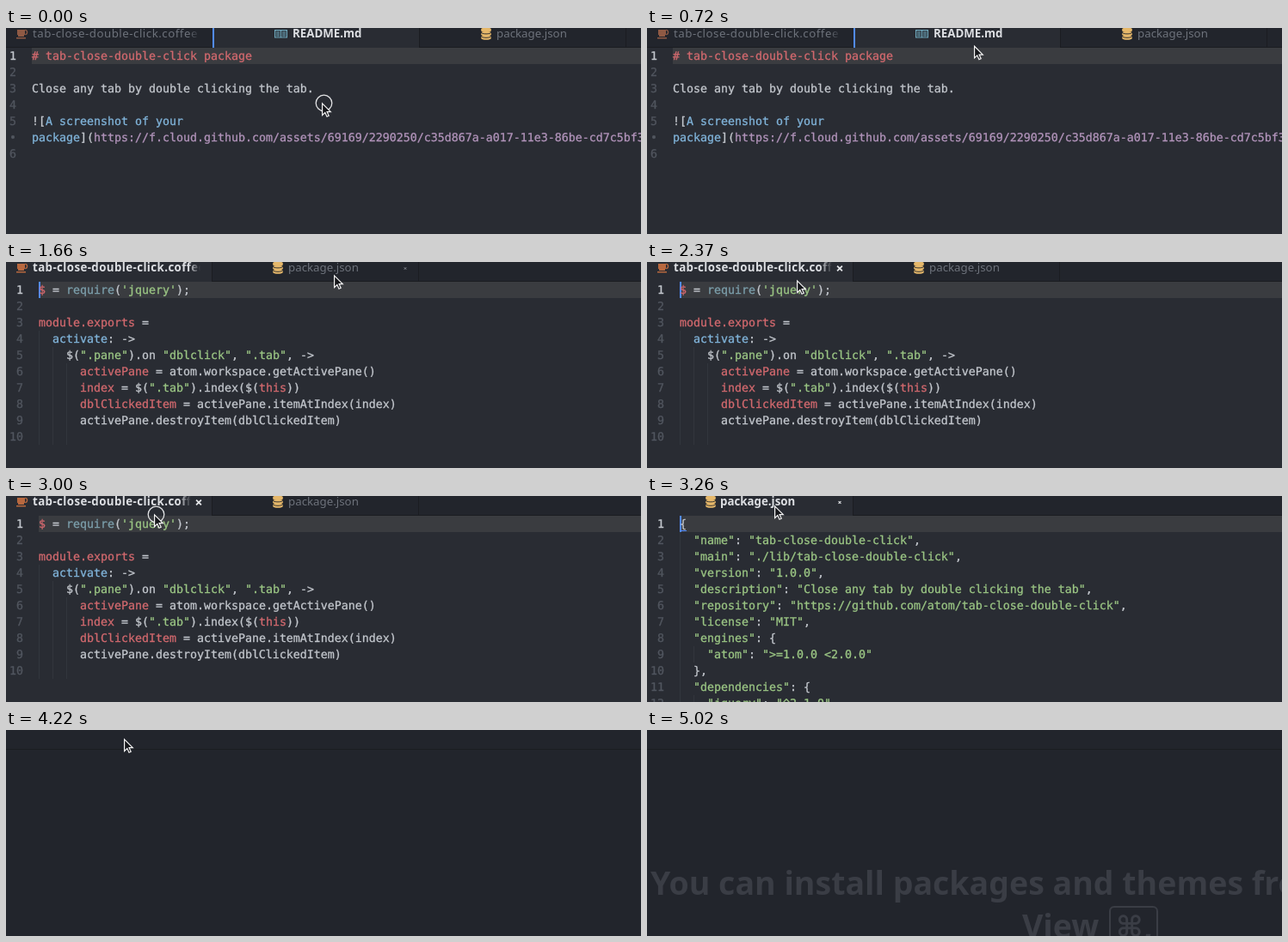
An HTML page with a canvas that plays this animation: 738x240 px, repeating every 5290 ms.

```html
<!DOCTYPE html>
<html lang="en">
<head>
<meta charset="utf-8">
<title>Closing tabs with a double click</title>
<style>
html, body { margin: 0; width: 738px; height: 240px; overflow: hidden; background: #22252c; }
#stage { position: relative; width: 738px; height: 240px; overflow: hidden; }
canvas, .scene { position: absolute; left: 0; top: 0; width: 738px; height: 240px; overflow: hidden; }
.scene { visibility: hidden; }
.scene div { position: absolute; white-space: pre; }
.row, .num { font: 13.29px/19px "DejaVu Sans Mono", monospace; text-rendering: geometricPrecision; -webkit-text-stroke: .3px; }
.num { color: #51565f; text-align: right; }
.num.on { color: #c3c7cd; }
.tab { top: -3px; height: 18px; overflow: hidden; font: 500 13.3px/18px "Noto Sans", "Open Sans", sans-serif; color: #6d727b; }
.tab.on { color: #dddfe3; font-weight: 600; }
.long { letter-spacing: .5px; -webkit-mask-image: linear-gradient(to left, transparent, #000 14px); mask-image: linear-gradient(to left, transparent, #000 14px); }
.long.on { letter-spacing: .4px; }
.tip { font: bold 37.5px/50px "Noto Sans", "Open Sans", sans-serif; color: #3a3d45; }
.key { left: 537px; top: 205px; width: 53px; height: 50px; border: 2px solid #3a3d45; border-radius: 6px; }
.mark { font: bold 34px/50px "DejaVu Sans", sans-serif; color: #3a3d45; }
</style>
</head>
<body>
<div id="stage"></div>
<script>
const LOOP = 5290, W = 738, H = 240, ROW = 19, TOP = 23, CH = 8;
const BAR = '#22252c', PAGE = '#292c33', EDGE = '#1b1d21';
const INK = { w: '#c3c7cd', r: '#d2696e', b: '#80b4da', p: '#b294bb', g: '#9bc684', c: '#7c9fab' };
const stage = document.getElementById('stage');

function add(parent, cls, x, y, text) {
  const el = document.createElement('div');
  el.className = cls;
  if (x !== null) el.style.left = x + 'px';
  if (y !== null) el.style.top = y + 'px';
  el.textContent = text;
  parent.appendChild(el);
  return el;
}

function layer() {
  const c = document.createElement('canvas');
  c.width = W;
  c.height = H;
  stage.appendChild(c);
  return c.getContext('2d');
}

// "~x" switches to ink x
function codeRow(scene, x, y, src) {
  const row = add(scene, 'row', x, y, '');
  for (const part of ('~w' + src).split('~').slice(1)) {
    const span = document.createElement('span');
    span.style.color = INK[part[0]];
    span.textContent = part.slice(1);
    row.appendChild(span);
  }
}

function makeScene(codeX, lines, nums) {
  const scene = document.createElement('div');
  scene.className = 'scene';
  stage.appendChild(scene);
  lines.forEach((src, i) => {
    const y = TOP + 1 + i * ROW;
    codeRow(scene, codeX, y, src);
    const n = add(scene, i ? 'num' : 'num on', 4, y, nums ? nums[i] : i + 1);
    n.style.width = codeX - 22 + 'px';
  });
  return scene;
}

function tab(scene, x, name, active, width) {
  const el = add(scene, 'tab' + (active ? ' on' : '') + (width ? ' long' : ''), x, null, name);
  if (width) el.style.width = width + 'px';
  return el;
}

const back = layer();

const LONG = 'tab-close-double-click.coffee';
const readme = makeScene(30, [
  '~r# tab-close-double-click package', '',
  'Close any tab by double clicking the tab.', '',
  '![~bA screenshot of your',
  '~bpackage~w](~phttps://f.cloud.github.com/assets/69169/2290250/c35d867a-a017-11e3-86be-cd7c5bf3',
  ''
], ['1', '2', '3', '4', '5', '•', '6']);
tab(readme, 31, LONG, false, 195);
tab(readme, 333, 'README.md', true);
tab(readme, 570, 'package.json', false);

const coffee = makeScene(38, [
  "~r$~w = ~crequire~w(~g'jquery'~w);", '',
  '~rmodule.exports~w =',
  '  ~bactivate~w: ->',
  '    $(~g".pane"~w).on ~g"dblclick"~w, ~g".tab"~w, ->',
  '      ~ractivePane~w = atom.workspace.getActivePane()',
  '      ~rindex~w = $(~g".tab"~w).index($(~rthis~w))',
  '      ~rdblClickedItem~w = activePane.itemAtIndex(index)',
  '      activePane.destroyItem(dblClickedItem)', ''
]);
const longTab = tab(coffee, 31, LONG, true, 195);
tab(coffee, 328, 'package.json', false);

const pair = (k, v) => `  ~g"${k}"~w: ~g"${v}"`;
const json = makeScene(38, [
  '{',
  pair('name', 'tab-close-double-click') + '~w,',
  pair('main', './lib/tab-close-double-click') + '~w,',
  pair('version', '1.0.0') + '~w,',
  pair('description', 'Close any tab by double clicking the tab') + '~w,',
  pair('repository', 'https://github.com/atom/tab-close-double-click') + '~w,',
  pair('license', 'MIT') + '~w,',
  '  ~g"engines"~w: {',
  '  ' + pair('atom', '>=1.0.0 <2.0.0'),
  '  },',
  '  ~g"dependencies"~w: {',
  '  ' + pair('jquery', '^2.1.0')
]);
tab(json, 85, 'package.json', true);

const empty = makeScene(38, []);
add(empty, 'tip', 4, 153, 'You can install packages and themes from the Settings');
add(empty, 'tip', 436, 203, 'View');
add(empty, 'key', null, null, '');
add(empty, 'mark', 545, 204, '⌘');
add(empty, 'tip', 577, 203, ',');

const scenes = [readme, coffee, json, empty];
const starts = [0, 1580, 3090, 4220];
const front = layer();

function box(x, y, w, h, color) {
  back.fillStyle = color;
  back.fillRect(x, y, w, h);
}

function stroke(g, color, width, draw) {
  g.strokeStyle = color;
  g.lineWidth = width;
  g.beginPath();
  draw(g);
  g.stroke();
}

function cup(color) {
  box(13, 2, 9, 6, color);
  box(14, 8, 7, 2, color);
  box(12, 11, 11, 1.5, color);
  stroke(back, color, 1.3, g => g.arc(22, 5, 2.6, -1.5, 1.5));
}

function stack(x) {
  back.fillStyle = '#e6b86a';
  for (let i = 0; i < 3; i++) {
    back.beginPath();
    back.ellipse(x + 6, 1.5 + i * 4.4, 6, 2, 0, 0, 7);
    back.ellipse(x + 6, 3 + i * 4.4, 6, 2, 0, 0, 7);
    back.fill();
    if (i) stroke(back, BAR, .9, g => g.ellipse(x + 6, .5 + i * 4.4, 6, 2, 0, 0, Math.PI));
  }
}

function book() {
  stroke(back, '#6fa8bd', 1.2, g => {
    g.rect(312.6, 2.6, 6.9, 8.4);
    g.rect(319.5, 2.6, 6.9, 8.4);
    for (const y of [5, 7, 9]) {
      g.moveTo(314, y); g.lineTo(318, y);
      g.moveTo(321, y); g.lineTo(325, y);
    }
  });
}

function cross(x, size, color) {
  const r = 2.9 * size;
  stroke(back, color, .3 + 1.5 * size, g => {
    g.moveTo(x - r, 7.5 - r); g.lineTo(x + r, 7.5 + r);
    g.moveTo(x + r, 7.5 - r); g.lineTo(x - r, 7.5 + r);
  });
}

function guides(depths) {
  depths.forEach((d, row) => {
    for (let i = 0; i < d; i++) box(38 + i * 2 * CH, TOP + row * ROW, 1, ROW, '#32363d');
  });
}

const within = (t, a, b) => t >= a && t < b;

function drawBack(t, k) {
  box(0, 0, W, H, BAR);
  box(0, 22, W, 1, EDGE);
  if (k === 3) return;
  const tabX = k ? 0 : 242, tabW = k ? 239 : 238;
  const codeX = k ? 38 : 30;
  box(0, TOP, W, H - TOP, PAGE);
  box(tabX, 0, tabW, TOP, PAGE);
  box(tabX + tabW, 0, 1, TOP, EDGE);
  box(codeX, TOP, W - codeX, ROW, '#3a3c40');
  if (k === 0) {
    box(720, 0, 1, TOP, EDGE);
    box(240, 0, 2, TOP, '#528bff');
    cup('#8f5a44');
    book();
    stack(552);
    return;
  }
  if (k === 1) {
    box(479, 0, 1, TOP, EDGE);
    guides([0, 0, 0, 1, 2, 3, 3, 3, 3, 3]);
    cup('#b8683f');
    stack(310);
    if (t < 2020) cross(464, t < 1750 ? .4 : 1, '#9a9ea6');
    if (t >= 2190) cross(224, t < 2280 ? .5 : 1, '#e4e6e9');
  } else {
    guides([0, 1, 1, 1, 1, 1, 1, 1, 2, 1, 1, 2]);
    box(39, TOP + ROW - 2, CH - 1, 1, '#528bff');
    stack(68);
    if (t >= 3180) cross(224, t < 3350 ? .5 : t < 3440 ? .7 : 1, '#e4e6e9');
  }
  const off = within(t, 2020, 2370) || within(t, 2730, 3090) || within(t, 3440, 3780);
  if (!off) box(38, TOP, 2, ROW, '#528bff');
}

// start, end, number of steps, end x, end y
const MOVES = [
  [360, 810, 6, 381, 15],
  [1930, 2370, 6, 174, 21],
  [2460, 2550, 2, 172, 21],
  [3180, 3260, 2, 148, 11],
  [3610, 3780, 3, 137, 10],
  [4490, 4940, 6, 709, 236]
];
const CLICKS = [[0, 90], [1250, 1320], [1490, 1580], [2640, 2730], [3000, 3090], [3950, 4040], [4130, 4220]];

function pointer(t) {
  let x = 367, y = 87;
  for (const [a, b, n, endX, endY] of MOVES) {
    if (t < a) break;
    const p = Math.min(1, (Math.floor((t - a) / (b - a) * (n - 1) + .01) + 1) / n);
    const e = p * p * (3 - 2 * p);
    x += (endX - x) * e;
    y += (endY - y) * e;
  }
  return [x, y];
}

function drawFront(t) {
  front.clearRect(0, 0, W, H);
  if (t >= 5020) return;
  const [x, y] = pointer(t);
  front.save();
  front.translate(x, y);
  if (CLICKS.some(([a, b]) => within(t, a, b))) {
    stroke(front, '#e2e3e5', 1.3, g => g.arc(2.5, .5, 9.3, 0, 7));
  }
  const arrow = new Path2D('M.6 .9V14.6L3.8 11.6L6 16.3L8.2 15.3L6.1 10.7H10.3Z');
  front.fillStyle = '#15161a';
  front.fill(arrow);
  front.strokeStyle = '#f4f4f4';
  front.lineWidth = 1.2;
  front.stroke(arrow);
  front.restore();
}

function frame(now) {
  const t = now % LOOP;
  const k = starts.filter(s => t >= s).length - 1;
  scenes.forEach((s, i) => { s.style.visibility = i === k ? 'visible' : 'hidden'; });
  longTab.style.width = (t >= 2190 ? 184 : 195) + 'px';
  empty.style.opacity = Math.min(1, Math.max(0, (t - 4580) / 360));
  drawBack(t, k);
  drawFront(t);
  requestAnimationFrame(frame);
}
requestAnimationFrame(frame);
</script>
</body>
</html>
```
